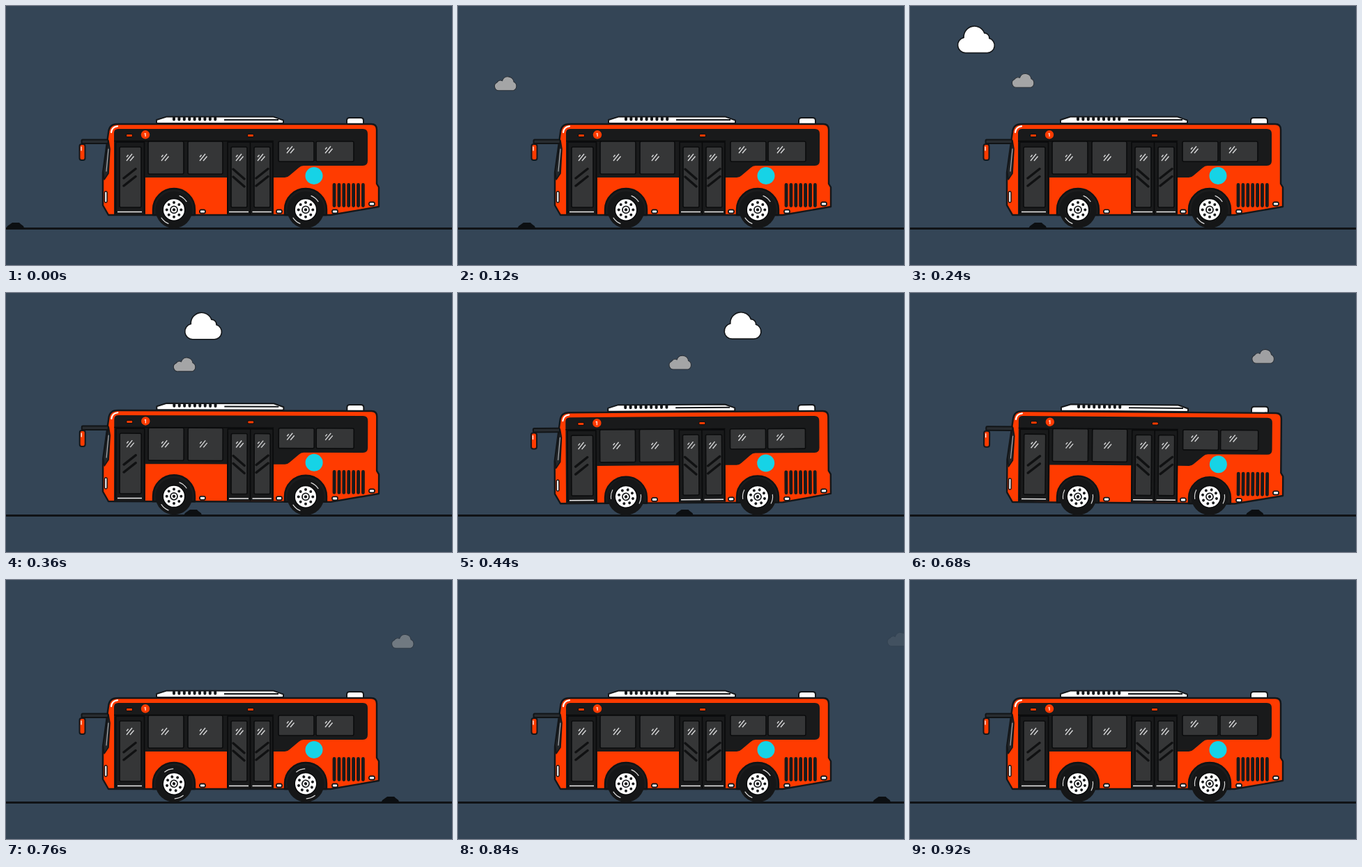
Write an HTML page that moves like this. It is 640x373 px and loops after 0.96 s.

```html
<!DOCTYPE html>
<html lang="en">
<head>
<meta charset="utf-8">
<title>Bus ride</title>
<style>
  html, body { margin: 0; width: 100%; height: 100%; overflow: hidden; background: #344556; }
  svg { display: block; width: 100%; height: 100%; }
</style>
</head>
<body>
<svg id="stage" viewBox="0 0 640 373" preserveAspectRatio="none">
  <defs>
    <path id="glint" d="M-5 5L3-5M0 5L5.500-1.500M-5-.5l2.500-3" fill="none" stroke="#d6d7d8" stroke-width="1.4"/>
    <rect id="lamp" x="-4" y="-2.5" width="8" height="5" rx="2" fill="#fff" stroke="#14171a" stroke-width="1.8"/>
    <g id="wheel">
      <circle r="26.5" fill="#151617"/>
      <path d="M8-20A21.5 21.5 0 0 1 18-11.8M-8 20A21.5 21.5 0 0 1-18 11.8" fill="none" stroke="#d8d8d8" stroke-width="1.2" stroke-linecap="round"/>
      <circle r="15.800" fill="#fff" stroke="#08090a" stroke-width="1.5"/>
      <g id="bolts" fill="#17191b"></g>
      <circle r="5" fill="#fff" stroke="#17191b" stroke-width="1.8"/>
      <circle r="2.2" fill="#17191b"/>
    </g>
  </defs>

  <rect width="640" height="373" fill="#344556"/>
  <path id="far" fill="#a4a5a6" stroke="#2b3138" stroke-width="1.1"
    d="M-10 10A6.200 6.200 0 0 1-13-1.800A6 6 0 0 1-5.500-4A8.500 8.500 0 0 1 11-2.500A6.800 6.800 0 0 1 10.500 10Z"/>
  <path id="near" fill="#fff" stroke="#14171a" stroke-width="1.6"
    d="M-15 19.5A11 11 0 0 1-17.5-2.2A15 15 0 0 1 11.5-8.5A7 7 0 0 1 18.5-1A10.5 10.5 0 0 1 15.5 19.5Z"/>
  <rect y="319" width="640" height="3" fill="#101316"/>
  <path id="rock" fill="#0c0f12" d="M-13 321L-11 317L-4 312H6L8 314L12 317L13.5 321Z"/>

  <g id="body" stroke-linejoin="round">
    <path d="M216 169V164L230 159.600H384L398 164.600V169Z" fill="#fff" stroke="#14171a" stroke-width="2"/>
    <g id="ticks" stroke="#14171a" stroke-width="4" stroke-linecap="round"></g>
    <path d="M313 164H391" stroke="#14171a" stroke-width="2"/>
    <path d="M489 170V165Q489 161 493 161H509Q513 161 513 165V170Z" fill="#fff" stroke="#14171a" stroke-width="2"/>

    <path d="M147 182Q148 170 160 170H524Q532 170 532 178V256L535 261V289L466 301H147L139 287V240Z"
      fill="#ff3b00" stroke="#14171a" stroke-width="2.4"/>
    <path d="M151 182Q152 174 160 173.2" fill="none" stroke="#fff" stroke-width="2.2" stroke-linecap="round"/>
    <path d="M147 194L149 206L147 241L141 250L139.5 238Z" fill="#24272a" stroke="#14171a" stroke-width="1.6"/>
    <path d="M147 206L144 238" stroke="#a9adb1" stroke-width="1.2" stroke-linecap="round"/>
    <rect x="141.5" y="267" width="3.5" height="16" rx="1.7" fill="#fff" stroke="#14171a" stroke-width="1.5"/>
    <rect x="108.5" y="192.5" width="38" height="5.5" rx="1.5" fill="#282c30" stroke="#111416" stroke-width="2"/>
    <rect x="105.5" y="199" width="8" height="23" rx="3" fill="#ff3b00" stroke="#14171a" stroke-width="2"/>
    <path d="M108 203V208" stroke="#fff" stroke-width="1.3" stroke-linecap="round"/>

    <path d="M155 183Q155 177 161 177H512Q519 177 519 184V223Q519 230 512 230H427Q423 230 420 233L407 244Q404 247 400 247H384V300H317V247H200V300H155Z" fill="#191a1b"/>
    <path d="M155 194.5H384" stroke="#090a0b" stroke-width="1.4"/>
    <g id="panes" fill="#353637" stroke="#0b0c0d" stroke-width="1.6"></g>
    <path d="M157.5 299V196H198.5V299M318 299V196H383V299M350.5 196V300" fill="none" stroke="#090a0b" stroke-width="1.5"/>
    <path d="M160 296.5H195M320 296.5H348M353.5 296.5H381" stroke="#ececec" stroke-width="1.5"/>
    <path d="M169 248L186 234.5M169 259L186 245.5M326 235L342 249M326 246L342 260M359 248L376 234.5M359 259L376 245.5"
      stroke="#101112" stroke-width="3.4" stroke-linecap="round"/>
    <g id="glints"></g>
    <g fill="#ff3b00" stroke="#0b0c0d">
      <rect x="172.5" y="184.5" width="9" height="4" rx="1.5"/>
      <rect x="346.5" y="184.5" width="9" height="4" rx="1.5"/>
    </g>
    <circle cx="200" cy="185.3" r="6.2" fill="#ff3b00"/>
    <text x="199.8" y="188.3" font-family="Roboto, sans-serif" font-size="8" font-weight="700" fill="#fff" text-anchor="middle">1</text>

    <circle cx="442" cy="244.5" r="12.5" fill="#16d3e6"/>
    <g id="vents" stroke="#191a1b" stroke-width="4.800" stroke-linecap="round"></g>
    <g fill="#1b1c1d" stroke="#111315" stroke-width="2.4">
      <path d="M211 301V293A30 30 0 0 1 271 293V301Z"/>
      <path d="M400 301V293A30 30 0 0 1 460 293V301Z"/>
    </g>
    <g id="lamps"></g>
  </g>

  <use id="front" href="#wheel"/>
  <use id="rear" href="#wheel"/>
</svg>
<script>
const LOOP = 960, STEP = 40;
const FRONT = 241, REAR = 430, AXLE = 293.4;
const FRONT_HIT = 315, REAR_HIT = 581;
const $ = id => document.getElementById(id);
const fill = (id, items, draw) => { $(id).innerHTML = items.map(draw).join(''); };
const range = (n, start, step) => Array.from({ length: n }, (_, i) => start + i * step);
const place = (ref, [x, y]) => `<use href="#${ref}" x="${x}" y="${y}"/>`;

fill('bolts', range(8, 0, Math.PI / 4), a =>
  `<circle cx="${10.3 * Math.cos(a)}" cy="${10.3 * Math.sin(a)}" r="2"/>`);
fill('ticks', range(9, 241, 7.4), x => `<path d="M${x} 161V163.5"/>`);
fill('vents', range(7, 471, 6.9), x => `<path d="M${x} 257.5V287.5"/>`);
fill('panes', [
  [204, 195, 51, 47], [261, 195, 50, 47], [391, 195, 51, 29], [445, 195, 54, 29],
  [163, 203, 31, 87], [323, 203, 23, 87], [356, 203, 23, 87]
], ([x, y, w, h]) => `<rect x="${x}" y="${y}" width="${w}" height="${h}" rx="2"/>`);
fill('glints', [[178, 218], [228, 218], [283, 218], [335, 218], [366, 218], [408, 207], [463, 207]],
  p => place('glint', p));
fill('lamps', [[282, 296], [392, 296], [472, 296], [525, 285]], p => place('lamp', p));

const clamp = v => Math.min(1, Math.max(0, v));
const move = (id, x, y, more = '') => $(id).setAttribute('transform', `translate(${x} ${y})${more}`);

// Suspension sway in degrees around the moment an axle meets the rock.
const SWAY = [[-80, 0], [0, 0.6], [100, -0.45], [180, 0]];
function sway(t) {
  for (let i = 1; i < SWAY.length; i++) {
    const [a, from] = SWAY[i - 1], [b, to] = SWAY[i];
    if (t >= a && t < b) {
      const k = (t - a) / (b - a);
      return from + (to - from) * k * k * (3 - 2 * k);
    }
  }
  return 0;
}
const hop = t => -5.5 * Math.exp(-((t / 30) ** 2));

function render(t) {
  move('rock', 13 + 0.708 * t, 0);
  move('near', 95 + 1.568 * (t - 240), 47.6 - 0.0065 * (t - 240), ' scale(1.02)');
  move('far', 163 + 0.783 * (t - 240), 107.3 - 0.0365 * (t - 240));
  $('far').setAttribute('opacity', clamp((864 - t) / 192));

  const spin = ` rotate(${-360 * 4 * t / LOOP})`;
  move('front', FRONT, AXLE + hop(t - FRONT_HIT), spin);
  move('rear', REAR, AXLE + hop(t - REAR_HIT), spin);

  const nose = sway(t - FRONT_HIT), tail = sway(t - REAR_HIT);
  move('body', 0, -1.6 * (nose + tail),
    ` rotate(${nose} ${REAR} ${AXLE}) rotate(${-tail} ${FRONT} ${AXLE})`);
}

const start = performance.now();
function tick() {
  const t = (performance.now() - start) % LOOP;
  render(Math.floor(t / STEP) * STEP);
  requestAnimationFrame(tick);
}
tick();
</script>
</body>
</html>
```
